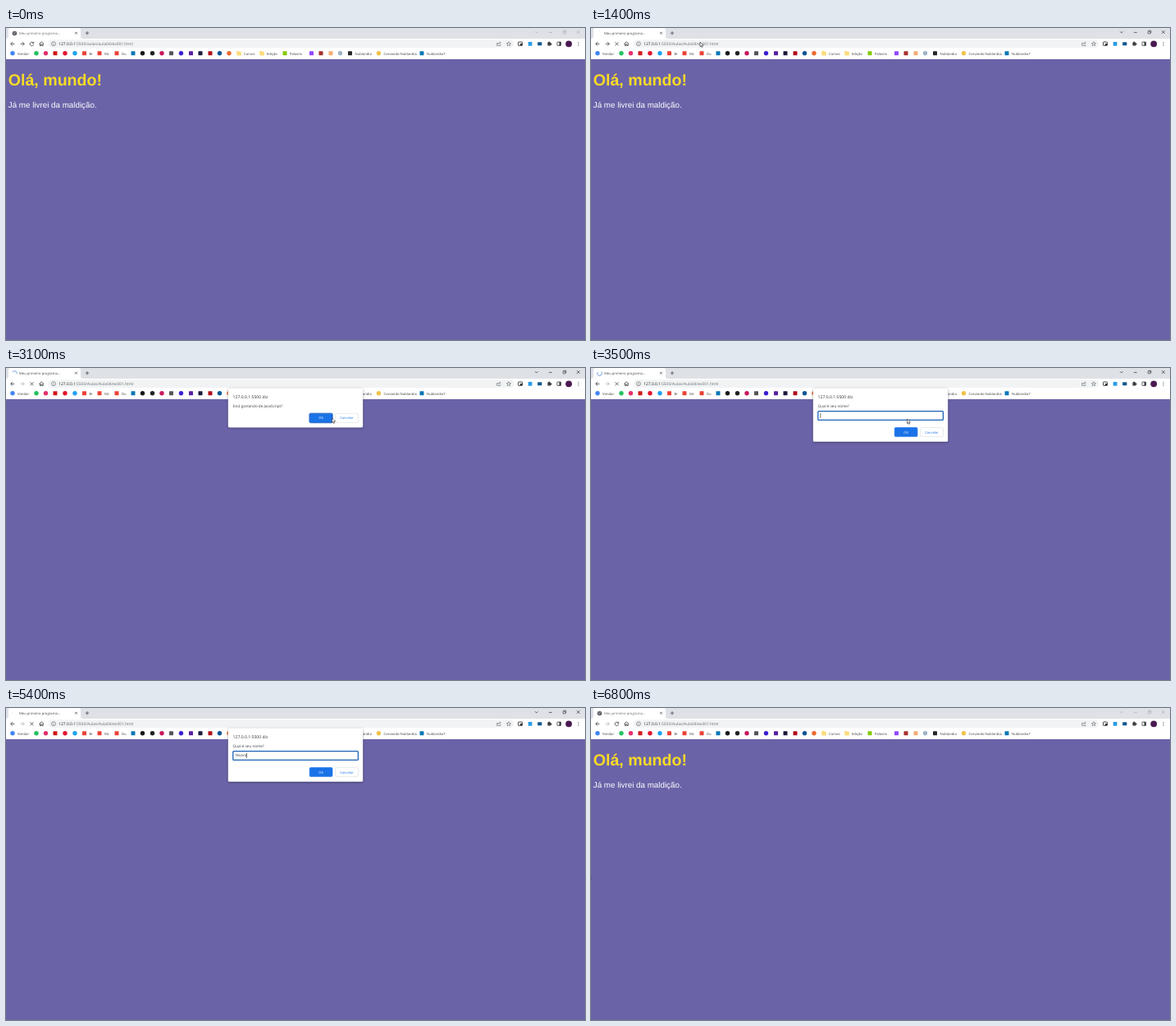
Recreate the animation shown at these times as an HTML page with a canvas. Size 706 by 380 pixels, loop 6900 ms.

```html
<!DOCTYPE html>
<html lang="pt-br">
<head>
<meta charset="utf-8">
<title>Meu primeiro programa</title>
<style>
  html, body { margin: 0; width: 100%; height: 100%; overflow: hidden; }
  canvas { display: block; }
</style>
</head>
<body>
<canvas id="stage" width="706" height="380"></canvas>
<script>
const ctx = document.getElementById('stage').getContext('2d');
const LOOP = 6900, STEP = 100, TAU = Math.PI * 2;
const UI = '"Open Sans", "Noto Sans", sans-serif';
const PAGE = 'Arial, "Liberation Sans", sans-serif';
const INK = '#3c4043', BLUE = '#1a73e8';

// Moments in ms
const FOCUS = 500, RELOAD = 1400, CLEAR = 1500, ALERT = 1700, CONFIRM = 2500,
      PROMPT = 3500, SUBMIT = 5500, LOADED = 5800, BLUR = 6800;
const NAME = 'Nivara', KEYS = [4100, 4600, 4900, 5000, 5200, 5300];
const POINTER = [
  [[800, 240, 56], [1100, 186, 24], [1200, 133, 17], [1500, 133, 17], [1900, 315.5, 41],
   [2200, 417, 60], [2700, 417, 60], [3100, 397.5, 61], [3400, 385.5, 62], [4000, 385.5, 62]],
  [[5800, 385.5, 62], [6300, -3, 202.5], [6900, -3, 202.5]]
];

// Bookmarks: x, colour, shape, label
const BOOKMARKS = [
  [8, '#4285f4', 'o', 'Vondar'], [37, '#25c160', 'o'], [48.5, '#e2306c', 'o'], [60, '#d01818', 's'],
  [72, '#e0142c', 'o'], [84, '#1da1f2', 'o'], [95.5, '#ea4335', 's', 'Br'], [114, '#ea4335', 's', 'Mz'],
  [135, '#ea4335', 's', 'Du'], [155, '#0a78b5', 's'], [166.5, '#191717', 'o'], [178.5, '#222', 'o'],
  [190, '#c8175d', 'o'], [201.5, '#55565a', 's'], [213.5, '#3a20d0', 'o'], [225.5, '#5a20a0', 's'],
  [237, '#1b1a3c', 's'], [249, '#b0101c', 's'], [260.5, '#0c5792', 'o'], [272, '#ee6a2c', 'o'],
  [284, '#fbdc7c', 'f', 'Cursos'], [312, '#fbdc7c', 'f', 'Edição'], [340, '#84c80a', 's', 'Palavrix'],
  [372.5, '#9146ff', 's'], [384, '#a5302c', 's'], [396, '#f6ac74', 's'], [407.5, '#9fb3c4', 'o'],
  [419.5, '#26282c', 's', 'Nublandia'], [454.5, '#efc24a', 'o', 'Corvando Nublandia'],
  [507, '#0a78b5', 's', 'Nublandia7']
];

function text(str, x, y, size, color, font = UI, align = 'left', weight = '') {
  ctx.font = `${weight} ${size}px ${font}`;
  ctx.textAlign = align;
  ctx.fillStyle = color;
  ctx.fillText(str, x, y);
}

function box(x, y, w, h, fill, r = 0, stroke, width = 0.6) {
  ctx.beginPath();
  ctx.roundRect(x, y, w, h, r);
  if (fill) { ctx.fillStyle = fill; ctx.fill(); }
  if (stroke) { ctx.strokeStyle = stroke; ctx.lineWidth = width; ctx.stroke(); }
}

function dot(x, y, r, fill) {
  ctx.beginPath();
  ctx.arc(x, y, r, 0, TAU);
  ctx.fillStyle = fill;
  ctx.fill();
}

function line(path, color, width = 0.8, x = 0, y = 0) {
  ctx.save();
  ctx.translate(x, y);
  ctx.strokeStyle = color;
  ctx.lineWidth = width;
  ctx.stroke(new Path2D(path));
  ctx.restore();
}

function spinner(elapsed) {
  const ARC = 666, p = elapsed % ARC / ARC;
  const sweep = 270 * p * p * (3 - 2 * p);
  const shrinking = Math.floor(elapsed / ARC) % 2;
  const start = -90 + 360 * elapsed / 1568 + 270 * Math.floor(elapsed / ARC / 2);
  const from = shrinking ? start + sweep : start;
  const to = Math.max(from + 5, shrinking ? start + 270 : start + sweep);
  ctx.beginPath();
  ctx.arc(10.5, 6.5, 2.8, from * TAU / 360, to * TAU / 360);
  ctx.strokeStyle = '#4a7fd6';
  ctx.lineWidth = 0.8;
  ctx.stroke();
}

function tabStrip(t, loading) {
  const focused = t >= FOCUS && t < BLUR;
  box(0, 0, 706, 13, '#dee1e6');
  ctx.fillStyle = '#fff';
  ctx.fill(new Path2D('M0 13Q3 13 3 10V2Q3 0 5 0H89Q91 0 91 2V10Q91 13 94 13Z'));
  if (loading) spinner(Math.min(t, SUBMIT) - RELOAD);
  else {
    dot(10.5, 6.5, 2.8, '#505357');
    line('M-1.8-.8Q-.4-.8-.4.4T1 1.8M.2-2Q.4-.6 1.9-.5', '#e8eaed', 0.6, 10.5, 6.5);
  }
  text('Meu primeiro programa...', 16, 8, 4.2, focused ? '#45494d' : '#6b6f74');
  line('M-1.4-1.4 1.4 1.4M1.4-1.4-1.4 1.4', INK, 0.7, 85.5, 6.2);
  line('M-2.2 0H2.2M0-2.2V2.2', INK, 0.7, 99, 6.2);
  const tone = focused ? '#303236' : '#a9adb3';
  line('M-1.8-.8 0 1 1.8-.8', tone, 0.7, 646.8, 5);
  line('M-1.9 .4H1.9', tone, 0.7, 663.8, 5);
  line('M-1.8-1H1V1.8H-1.8ZM-1-1V-1.8H1.8V1H1', tone, 0.6, 681, 5);
  line('M-1.9-1.9 1.9 1.9M1.9-1.9-1.9 1.9', tone, 0.7, 697.8, 5);
}

function toolbar(t, loading) {
  box(0, 13, 706, 25, '#fff');
  const back = 'M2.4 0H-2.2M0-2.3-2.3 0 0 2.3';
  line(back, INK, 0.8, 8, 19.3);
  line('M-2.4 0H2.2M0-2.3 2.3 0 0 2.3', t < CLEAR ? INK : '#b5b8bc', 0.8, 20, 19.3);
  line(loading ? 'M-2-2 2 2M2-2-2 2' : 'M1.7-1.4A2.3 2.3 0 1 0 2.2.6M2.2-2.5V-.7H.4', INK, 0.8, 31.5, 19.3);
  line('M-2.8 0 0-2.5 2.8 0M-1.9-.5V2.3H-.6V.6H.6V2.3H1.9V-.5', INK, 0.8, 43.3, 19.3);

  box(51.5, 14.3, 568, 9.8, '#f1f3f4', 4.9);
  line('M2.5 0A2.5 2.5 0 1 1-2.5 0A2.5 2.5 0 1 1 2.5 0M0-.3V1.4M0-1.4V-.8', '#5f6368', 0.6, 58, 19.2);
  const host = '127.0.0.1', path = t < RELOAD ? 'aulas/aula04' : 'Aulas/Aula04';
  text(host, 64.3, 21, 4.85, '#202124');
  text(`:5500/${path}/ex001.html`, 64.3 + ctx.measureText(host).width, 21, 4.85, '#6a6e73');

  line('M-1-.8H-2.3V2.2H2V1M-1 .8Q-.8-1.2 1.4-1.2M.7-2.4 2.3-1.1 .7 .1', '#5f6368', 0.6, 601, 19.2);
  line('M0-2.6 .8-.8 2.6-.7 1.2.5 1.7 2.3 0 1.3-1.7 2.3-1.2.5-2.6-.7-.8-.8Z', '#5f6368', 0.6, 613, 19.3);
  box(624.6, 17, 5, 4.4, '#fff', 0.5, '#303236', 0.9);
  box(627, 19, 2.4, 2, '#303236');
  box(636.7, 16.9, 4.8, 4.8, '#2a9be6');
  box(648.2, 17.2, 5.2, 4, '#14588e', 0.5);
  box(660.4, 17.6, 4, 4, INK, 0.5);
  dot(662.2, 17.4, 1, INK);
  dot(664.6, 19.6, 1, INK);
  box(672, 17, 4.6, 4.4, '#fff', 0.3, INK, 0.8);
  box(674.5, 17, 2.1, 4.4, INK);
  dot(686.2, 19.3, 3.9, '#4a1a50');
  for (const y of [17.3, 19.3, 21.3]) dot(698, y, 0.55, INK);

  for (const [x, color, shape, label] of BOOKMARKS) {
    if (shape === 'o') dot(x, 30.8, 2.7, color);
    else if (shape === 's') box(x - 2.5, 28.3, 5, 5, color, 0.4);
    else { box(x - 2.7, 28.1, 2.8, 2, color, 0.4); box(x - 2.7, 28.8, 5.6, 4.6, color, 0.4); }
    if (label) text(label, x + 6, 32.5, 4.2, INK);
  }
}

function page(t) {
  box(0, 38, 706, 342, '#6a63a8');
  if (t >= CLEAR && t < LOADED) return;
  text('Olá, mundo!', 2.7, 69.9, 19.61, '#fadb25', PAGE, 'left', 'bold');
  text('Já me livrei da maldição.', 2.8, 97, 9.81, '#fff', PAGE);
}

function button(label, x, y, w, primary, ring) {
  if (ring) box(x - 0.4, y - 0.4, w + 0.8, 11.8, null, 1.8, '#8fb5ee', 1.2);
  box(x, y, w, 11, primary ? BLUE : '#fff', 1.4, primary ? (ring ? '#174ea6' : BLUE) : '#dadce0');
  text(label, x + w / 2, y + 7, 4.05, primary ? '#fff' : BLUE, UI, 'center');
}

function dialog(t) {
  if (t < ALERT || t >= SUBMIT) return;
  const prompt = t >= PROMPT, confirm = !prompt && t >= CONFIRM;
  ctx.save();
  ctx.shadowColor = 'rgba(0,0,0,.4)';
  ctx.shadowBlur = 3;
  ctx.shadowOffsetY = 0.6;
  box(270.8, 24.8, 164.4, prompt ? 65 : 47.6, '#fff', 1.6);
  ctx.restore();
  text('127.0.0.1:5500 diz', 276.6, 37, 5.1, '#303236');
  const message = prompt ? 'Qual é seu nome?'
    : confirm ? 'Está gostando de JavaScript?' : 'Minha primeira mensagem!';
  text(message, 276.6, 47.5, 4.58, INK);
  if (!prompt && !confirm) return button('OK', 406.2, 55.4, 23, true, true);

  const y = prompt ? 72.6 : 55.4;
  button('OK', 370.2, y, 27.8, true, confirm);
  button('Cancelar', 401.5, y, 28, false);
  if (!prompt) return;

  box(276.8, 52.6, 152.6, 10.8, '#fff', 1, '#1b62b5', 1.3);
  const pressed = KEYS.filter(key => key <= t);
  const typed = NAME.slice(0, pressed.length);
  text(typed, 279.4, 59.4, 4.6, INK);
  const caretX = 279.6 + ctx.measureText(typed).width;
  if ((t - (pressed.at(-1) ?? PROMPT)) % 1000 < 500) box(caretX, 55, 0.6, 6, '#202124');
}

function pointer(t) {
  for (const track of POINTER) {
    const i = track.findIndex(([time]) => time > t);
    if (t === track.at(-1)[0]) return arrow(track.at(-1)[1], track.at(-1)[2]);
    if (i < 1) continue;
    const [t0, x0, y0] = track[i - 1], [t1, x1, y1] = track[i];
    const p = (t - t0) / (t1 - t0);
    return arrow(x0 + (x1 - x0) * p, y0 + (y1 - y0) * p);
  }
}

function arrow(x, y) {
  ctx.save();
  ctx.translate(x, y);
  const shape = new Path2D('M0 0V5.6L1.3 4.5 2.2 6.5 3.1 6.1 2.2 4.1H4Z');
  ctx.fillStyle = '#fff';
  ctx.strokeStyle = '#222';
  ctx.lineWidth = 0.6;
  ctx.fill(shape);
  ctx.stroke(shape);
  ctx.restore();
}

function draw(now) {
  const t = Math.floor(now % LOOP / STEP) * STEP;
  const loading = t >= RELOAD && t < LOADED;
  ctx.textRendering = 'geometricPrecision';
  page(t);
  tabStrip(t, loading);
  toolbar(t, loading);
  dialog(t);
  pointer(t);
  requestAnimationFrame(draw);
}
requestAnimationFrame(draw);
</script>
</body>
</html>
```
